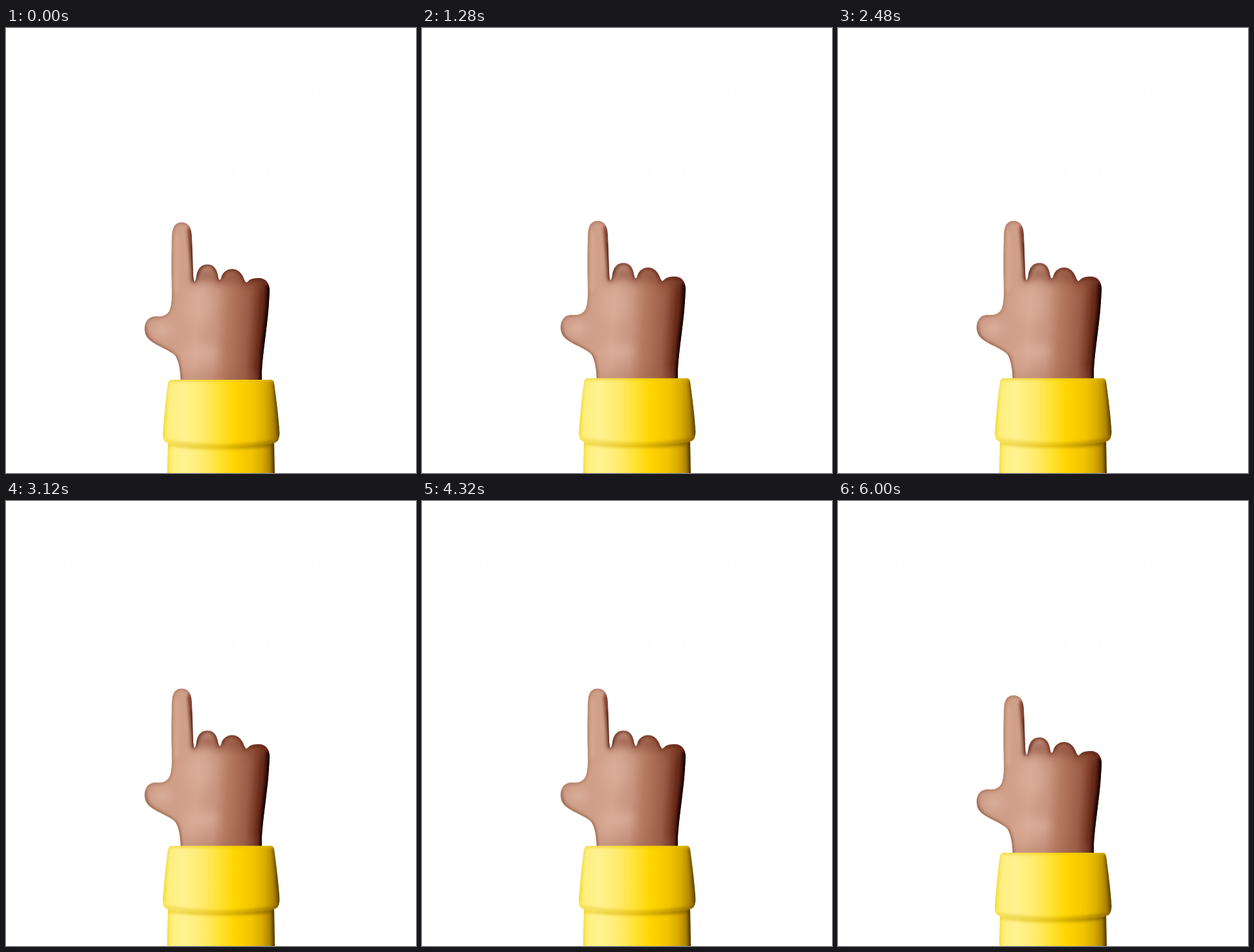
An HTML page for the animation above (6040 ms loop, 633x687 px).

```html
<!DOCTYPE html>
<html lang="ro">
<head>
<meta charset="utf-8">
<title>Pointing hand</title>
<style>
  html, body { margin: 0; width: 100%; height: 100%; overflow: hidden; background: #fff; }
  svg { display: block; width: 100%; height: 100%; }
  text { font-family: Inter, sans-serif; text-anchor: middle; fill: #fefefe; }
</style>
</head>
<body>
<svg viewBox="0 0 633 687">
  <defs>
    <linearGradient id="skin" gradientUnits="userSpaceOnUse" x1="214" x2="407" y1="450" y2="462">
      <stop offset="0" stop-color="#c99983"/>
      <stop offset=".2" stop-color="#cf9e88"/>
      <stop offset=".42" stop-color="#d4a48e"/>
      <stop offset=".57" stop-color="#c9957f"/>
      <stop offset=".66" stop-color="#b67b63"/>
      <stop offset=".82" stop-color="#9c5d47"/>
      <stop offset=".93" stop-color="#793a28"/>
      <stop offset="1" stop-color="#4a170c"/>
    </linearGradient>
    <linearGradient id="cloth">
      <stop offset="0" stop-color="#fbe951"/>
      <stop offset=".06" stop-color="#fff082"/>
      <stop offset=".17" stop-color="#fff291"/>
      <stop offset=".34" stop-color="#ffec6c"/>
      <stop offset=".5" stop-color="#ffe12c"/>
      <stop offset=".62" stop-color="#ffd500"/>
      <stop offset=".78" stop-color="#f2c400"/>
      <stop offset=".88" stop-color="#d9aa00"/>
      <stop offset=".95" stop-color="#b08600"/>
      <stop offset="1" stop-color="#7a5a00"/>
    </linearGradient>
    <linearGradient id="fold">
      <stop offset="0" stop-color="#ecd02c"/>
      <stop offset=".5" stop-color="#d6ab00"/>
      <stop offset="1" stop-color="#6e5000"/>
    </linearGradient>
    <filter id="soft" filterUnits="userSpaceOnUse" x="180" y="270" width="280" height="440">
      <feGaussianBlur stdDeviation="2.5"/>
    </filter>
    <filter id="wide" filterUnits="userSpaceOnUse" x="180" y="270" width="280" height="440">
      <feGaussianBlur stdDeviation="8"/>
    </filter>
    <path id="hand" d="M256 322C256 308 261 300 271 300S286 306 287 321L289 378Q289 388 291 392Q293 390 294 383C296 370 302 365 311 365S325 371 327 381Q328 388 330 389Q332 388 333 383C336 376 342 372 349 372S362 376 366 384Q369 392 371 393Q373 392 376 389C381 386 387 386 392 386C402 387 407 395 407 406C406 425 405 442 402 464C399 490 396 510 395 530V550H270C269 530 268 518 262 507C256 499 238 493 226 485C217 479 214 473 214 464C214 452 221 445 232 445C242 446 248 443 252 437C255 431 256 421 256 406C255 380 255 350 256 322Z"/>
    <path id="cuff" d="M257 543H409Q413 543 414 548C417 570 421 601 422.500 626Q422 635 419 638Q415 641 408 642Q332 649 256 642Q247 641 244 637Q242 634 242 626C244 598 247 570 250 548Q251 543 257 543Z"/>
    <path id="sleeve" d="M250 636H414L415.500 720H248Z"/>
    <clipPath id="handClip"><use href="#hand"/></clipPath>
    <clipPath id="cuffClip"><use href="#cuff"/></clipPath>
    <clipPath id="sleeveClip"><use href="#sleeve"/></clipPath>
  </defs>

  <text x="318" y="106" font-size="28" font-weight="500">Categoriile pe care le avem disponibile</text>
  <g font-size="44" font-weight="600">
    <text x="318" y="190">Descarca</text>
    <text x="318" y="231">Aplicatia</text>
  </g>

  <g id="arm">
    <g clip-path="url(#handClip)" fill="none" stroke-linecap="round">
      <use href="#hand" fill="url(#skin)"/>
      <g filter="url(#wide)">
        <ellipse cx="298" cy="428" rx="20" ry="28" fill="#dbb09c" opacity=".6"/>
        <ellipse cx="303" cy="502" rx="25" ry="12" fill="#dfb5a2" opacity=".6"/>
        <ellipse cx="240" cy="466" rx="16" ry="10" fill="#deb5a3" opacity=".8"/>
        <path d="M294 389Q312 370 328 389M332 388Q350 375 370 393M374 393H404" stroke="#81402b" stroke-width="13" opacity=".75"/>
        <path d="M403 400L391 550" stroke="#571b0e" stroke-width="14"/>
        <path d="M270 542H390" stroke="#9a5d48" stroke-width="7" opacity=".5"/>
      </g>
      <g filter="url(#soft)">
        <use href="#hand" stroke="#8a4a34" stroke-width="3" opacity=".65"/>
        <path d="M264 320L263 405" stroke="#d9ad99" stroke-width="6" opacity=".65"/>
        <path d="M284 312L287 350L290 389" stroke="#713220" stroke-width="7"/>
        <path d="M289 335L292 388" stroke="#210502" stroke-width="4"/>
        <path d="M294 384Q299 366 311 365T329 388M333 384Q337 372 349 372T370 392M375 390Q388 384 402 391" stroke="#5a2012" stroke-width="4"/>
        <path d="M407 399Q407 432 402 466T396 548" stroke="#180000" stroke-width="9"/>
        <path d="M214 458Q214 477 228 486T258 503" stroke="#6b3222" stroke-width="2"/>
        <path d="M262 507Q269 520 269 548" stroke="#7a4230" stroke-width="3"/>
      </g>
    </g>

    <g clip-path="url(#sleeveClip)" fill="none">
      <use href="#sleeve" fill="url(#cloth)"/>
      <g filter="url(#soft)">
        <path d="M250 641Q332 650 414 641V645Q332 654 250 645Z" fill="url(#fold)"/>
        <path d="M249 640L248 720" stroke="#e0c21c" stroke-width="2"/>
        <path d="M414 640L416 720" stroke="#4a3500" stroke-width="6"/>
      </g>
    </g>
    <g clip-path="url(#cuffClip)" fill="none">
      <use href="#cuff" fill="url(#cloth)"/>
      <g filter="url(#soft)">
        <path d="M250 543H414" stroke="#e8c500" stroke-width="3"/>
        <path d="M243 638Q332 653 422 638" stroke="url(#fold)" stroke-width="4" opacity=".8"/>
        <path d="M250 546Q244 590 242 632" stroke="#e0c21c" stroke-width="2"/>
        <path d="M415 545L423 632" stroke="#5c4200" stroke-width="6" opacity=".85"/>
      </g>
    </g>
  </g>
</svg>
<script>
  const LOOP = 6040, STEP = 40, HALF = 600, LIFT = 15;
  const arm = document.getElementById('arm');

  // cubic-bezier(.25, .1, .25, 1)
  function ease(x) {
    let lo = 0, hi = 1, u = .5;
    for (let i = 0; i < 24; i++) {
      u = (lo + hi) / 2;
      if (.75 * u * (1 - u) + u ** 3 < x) lo = u; else hi = u;
    }
    return .3 * u * (1 - u) ** 2 + 3 * u * u * (1 - u) + u ** 3;
  }

  function draw() {
    const t = Math.floor(performance.now() % LOOP / STEP) * STEP;
    const phase = t % (2 * HALF) / HALF;
    const lift = phase < 1 ? ease(phase) : 1 - ease(phase - 1);
    arm.setAttribute('transform', `translate(0 ${(-LIFT * lift).toFixed(2)})`);
    requestAnimationFrame(draw);
  }
  draw();
</script>
</body>
</html>
```
